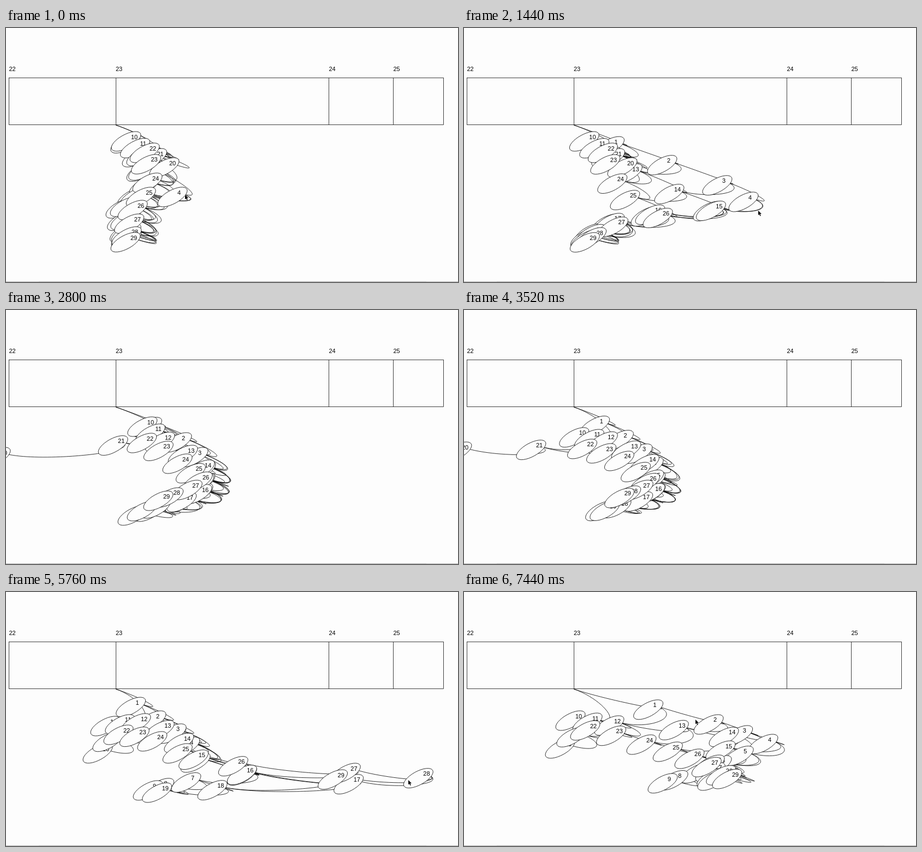
Animation, 828 px wide and 466 px high, one loop 7520 ms. Source, as an HTML page with a canvas:

```html
<!DOCTYPE html>
<html lang="en">
<head>
<meta charset="utf-8">
<title>Linked leaves</title>
<style>
  html, body { margin: 0; width: 100%; height: 100%; overflow: hidden; background: #fdfdfd; }
  canvas { display: block; }
</style>
</head>
<body>
<canvas id="stage" width="828" height="466"></canvas>
<script>
const LOOP = 7520, STEP = 80, COUNT = 30, ROW = 10;
const PAPER = '#fdfdfd', INK = '#000';
const ROOT = { x: 201, y: 178 };
const ctx = document.getElementById('stage').getContext('2d');

// Each leaf is tied to the next in its row and to the one diagonally below.
const links = [];
for (let i = 0; i < COUNT; i++) {
  if (i % ROW === ROW - 1) continue;
  links.push([i, i + 1]);
  if (i + ROW + 1 < COUNT) links.push([i, i + ROW + 1]);
}

// Number of links between one leaf and every other.
function hopsFrom(leaf) {
  const hops = Array(COUNT).fill(Infinity);
  hops[leaf] = 0;
  for (let pass = 0; pass < COUNT; pass++) {
    for (const [a, b] of links) {
      hops[a] = Math.min(hops[a], hops[b] + 1);
      hops[b] = Math.min(hops[b], hops[a] + 1);
    }
  }
  return hops;
}

// The three rows at rest, each a curve through the leaves at these places.
const KNOTS = [0, 2, 4, 6, 9];
const row = (...points) => points.map((p, n) => [KNOTS[n], ...p]);
const HEAD = [189, 186];
const shapes = [
  [row(HEAD, [240, 237], [250, 288], [210, 331], [220, 385]),
   row([220, 208], [248, 235], [253, 290], [218, 328], [221, 388]),
   row([290, 256], [254, 229], [259, 284], [232, 334], [219, 393])],
  [row(HEAD, [313, 243], [357, 295], [352, 336], [232, 377]),
   row([250, 214], [282, 242], [355, 293], [350, 338], [249, 369]),
   row([230, 245], [249, 244], [314, 282], [351, 315], [279, 350])],
  [row(HEAD, [266, 236], [327, 284], [336, 336], [260, 364]),
   row([182, 246], [238, 241], [316, 277], [336, 335], [263, 368]),
   row([168, 296], [206, 262], [267, 274], [320, 319], [288, 342])],
  [row(HEAD, [448, 243], [515, 282], [463, 318], [364, 351]),
   row([195, 236], [266, 245], [476, 266], [450, 317], [455, 346]),
   row([176, 287], [222, 254], [325, 280], [413, 306], [482, 343])]
];
const settles = [[1440, 2800], [2800, 4640], [5760, 7440]];

// A dragged leaf takes its neighbours along: time, dx, dy, reach in links.
const pulls = [
  { leaf: 4, keys: [[0, 55, 22, 0.5], [720, 448, 30, 1.2], [1040, 440, 32, 1.5],
    [1440, 262, 31, 2.3], [1600, 200, 25, 2.4], [2800, 0, 0, 4]] },
  { leaf: 20, keys: [[1760, 0, 0, 0.6], [2400, -110, 10, 0.6], [2560, -245, 20, 0.6],
    [2800, -249, 25, 0.75], [3520, -204, -17, 1.05], [3840, -115, 112, 1.2],
    [4000, -61, 89, 1.2], [4640, -18, 20, 3], [5760, 0, 0, 3]] },
  { leaf: 28, keys: [[4480, 0, 0, 0.6], [4640, 4, 18, 0.6], [4800, 412, 10, 1.2],
    [4960, 480, 5, 1.3], [5680, 480, 4, 1.5], [5760, 459, 3, 1.6],
    [6400, 200, -5, 2.5], [7440, 0, 0, 4]] },
  { leaf: 4, keys: [[6240, 0, 0, 1], [6960, 160, -5, 1.4], [7200, 100, 0, 1.4],
    [7440, 33, -3, 0.8]] }
].map(pull => ({ ...pull, hops: hopsFrom(pull.leaf) }));

const pointer = [[0, 328, 306], [720, 722, 316], [1040, 712, 325], [1440, 539, 335],
  [2560, -20, 268], [4000, -20, 330], [4640, 344, 350], [4960, 760, 348],
  [5680, 757, 347], [5760, 737, 345], [6960, 690, 290], [7440, 424, 234]];

// Smooth curve through the keys that never overshoots them.
function sample(keys, t, axis) {
  const last = keys.length - 1;
  if (t <= keys[0][0]) return keys[0][axis];
  if (t >= keys[last][0]) return keys[last][axis];
  let n = 0;
  while (keys[n + 1][0] <= t) n++;
  const slope = k => k < 0 || k >= last ? 0 :
    (keys[k + 1][axis] - keys[k][axis]) / (keys[k + 1][0] - keys[k][0]);
  const tangent = k => {
    const a = slope(k - 1), b = slope(k);
    if (k === 0) return b;
    return a * b > 0 ? 2 * a * b / (a + b) : 0;
  };
  const a = keys[n], b = keys[n + 1];
  const h = b[0] - a[0], u = (t - a[0]) / h, v = 1 - u;
  return a[axis] * (1 + 2 * u) * v * v + b[axis] * u * u * (3 - 2 * u)
    + h * u * v * (tangent(n) * v - tangent(n + 1) * u);
}

const at = (keys, t) => ({ x: sample(keys, t, 1), y: sample(keys, t, 2) });

const rests = shapes.map(rows => Array.from({ length: COUNT },
  (_, i) => at(rows[Math.floor(i / ROW)], i % ROW)));

function easeOut([from, to], t) {
  const u = Math.min(1, Math.max(0, (t - from) / (to - from)));
  return 1 - (1 - u) ** 2;
}

function placeLeaves(t) {
  const mix = settles.map(span => easeOut(span, t));
  const drags = pulls.map(({ keys, hops }) =>
    ({ ...at(keys, t), reach: sample(keys, t, 3), hops }));
  return rests[0].map((start, i) => {
    let { x, y } = start;
    mix.forEach((u, n) => {
      x += (rests[n + 1][i].x - x) * u;
      y += (rests[n + 1][i].y - y) * u;
    });
    for (const drag of drags) {
      const share = Math.exp(-((drag.hops[i] / drag.reach) ** 2));
      x += drag.x * share;
      y += drag.y * share;
    }
    return { x, y };
  });
}

function drawFrame() {
  ctx.lineWidth = 0.75;
  ctx.strokeRect(5.5, 91.5, 796, 86);
  ctx.beginPath();
  for (const x of [201.5, 591.5, 709.5]) {
    ctx.moveTo(x, 91.5);
    ctx.lineTo(x, 177.5);
  }
  ctx.stroke();
  ctx.fillStyle = INK;
  [5.5, 201, 591.5, 709.5].forEach((x, i) => ctx.fillText(22 + i, x, 78.5));
  ctx.fillStyle = '#ececec';
  ctx.fillRect(60, 464, 710, 1);
  ctx.fillStyle = '#b0b0b0';
  ctx.fillRect(0, 465, 828, 1);
}

function drawLinks(leaves) {
  const joints = leaves.map((c, i) => i ? { x: c.x + 12, y: c.y - 8 } : ROOT);
  ctx.beginPath();
  for (const [from, to] of links) {
    const a = joints[from], b = joints[to];
    ctx.moveTo(a.x, a.y);
    ctx.bezierCurveTo(a.x + 58, a.y + 20, b.x + 58, b.y + 20, b.x, b.y);
  }
  ctx.stroke();
}

function drawLeaf(c, name) {
  ctx.beginPath();
  ctx.ellipse(c.x, c.y, 30, 12.4, -0.5, 0, Math.PI * 2);
  ctx.fillStyle = PAPER;
  ctx.fill();
  ctx.stroke();
  ctx.fillStyle = INK;
  ctx.fillText(name, c.x + 9, c.y - 4.5);
}

function drawPointer({ x, y }) {
  const shape = [[0, 0], [0, 8.5], [2, 6.8], [3.4, 10], [4.8, 9.4], [3.4, 6.3], [6, 6.1]];
  ctx.beginPath();
  shape.forEach(([dx, dy]) => ctx.lineTo(x + dx, y + dy));
  ctx.closePath();
  ctx.strokeStyle = '#fff';
  ctx.stroke();
  ctx.fillStyle = INK;
  ctx.fill();
}

function draw(t) {
  ctx.fillStyle = PAPER;
  ctx.fillRect(0, 0, 828, 466);
  ctx.strokeStyle = INK;
  ctx.font = '11px "Liberation Sans", Arial, sans-serif';
  drawFrame();
  const leaves = placeLeaves(t);
  ctx.lineWidth = 0.8;
  drawLinks(leaves);
  for (let i = 1; i < COUNT; i++) drawLeaf(leaves[i], i);
  drawPointer(at(pointer, t));
}

const start = performance.now();
function tick() {
  const t = (performance.now() - start) % LOOP;
  draw(Math.floor(t / STEP) * STEP);
  requestAnimationFrame(tick);
}
tick();
</script>
</body>
</html>
```
